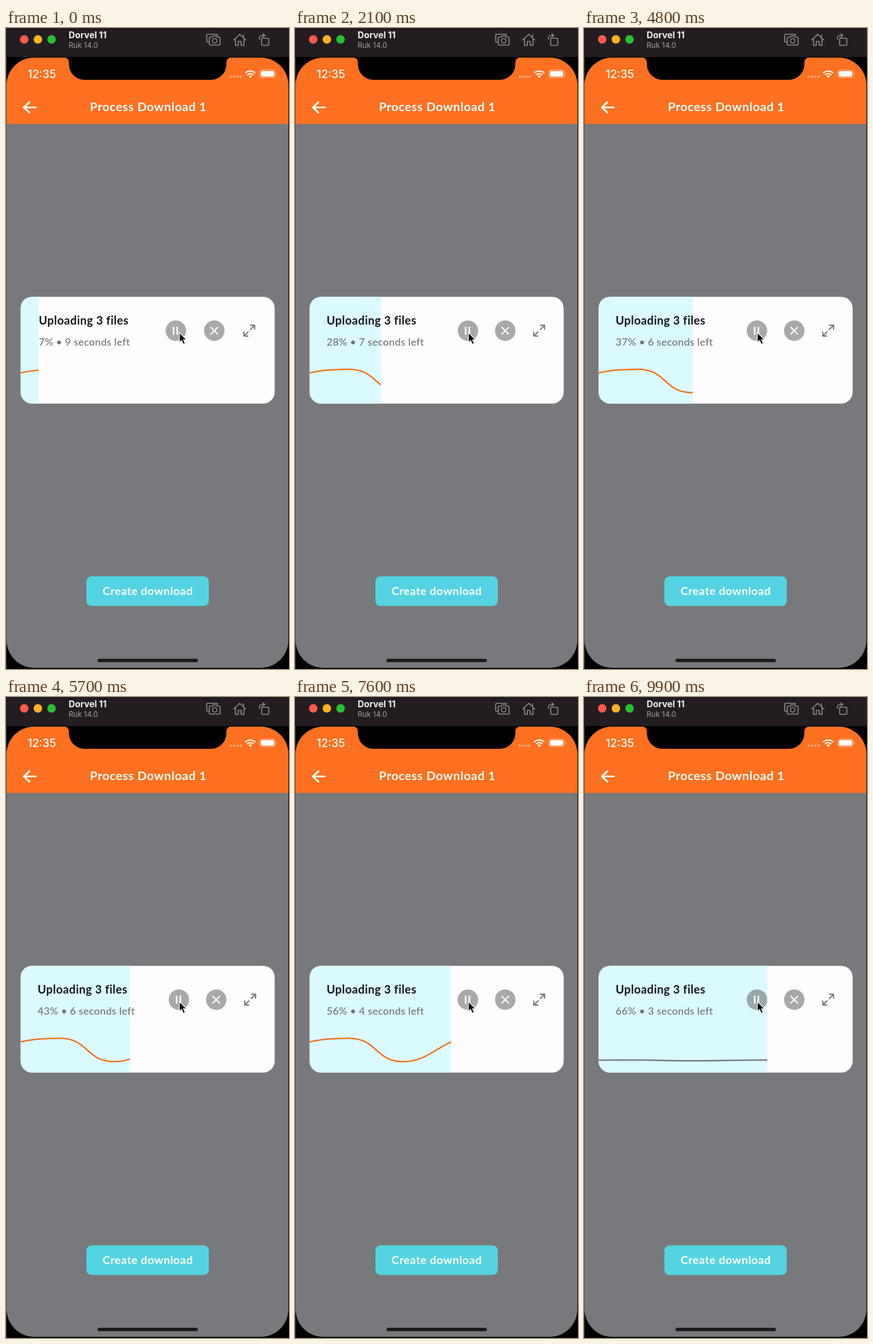
Write an HTML page that moves like this. It is 497x1126 px and loops after 10 s.

```html
<!DOCTYPE html>
<html lang="en">
<head>
<meta charset="utf-8">
<title>Upload progress</title>
<style>
  html, body { margin: 0; width: 100%; height: 100%; overflow: hidden; background: #000; }
  svg { display: block; width: 497px; height: 1126px; }
  text { font-family: Lato, sans-serif; font-weight: 700; }
  .ui { font-family: Inter, sans-serif; }
  .line { fill: none; stroke-linecap: round; stroke-linejoin: round; }
</style>
</head>
<body>
<svg viewBox="0 0 497 1126">
  <defs>
    <clipPath id="screen"><rect x="1" y="52" width="495" height="1072" rx="49"/></clipPath>
    <clipPath id="card"><rect x="25.600" y="472.200" width="446.200" height="187.500" rx="20"/></clipPath>
    <clipPath id="done"><rect id="doneArea" x="25.600" y="472" height="188"/></clipPath>
  </defs>

  <!-- Window bar -->
  <rect width="497" height="51" fill="#231d22"/>
  <circle cx="32" cy="20" r="7.5" fill="#ff5a50"/>
  <circle cx="56" cy="20" r="7.5" fill="#ffb224"/>
  <circle cx="80" cy="20" r="7.5" fill="#28c131"/>
  <text class="ui" x="110" y="18" font-size="15.5" fill="#f4f2f4">Dorvel 11</text>
  <text class="ui" x="110" y="35" font-size="13" style="font-weight:400" fill="#a39fa3">Ruk 14.0</text>
  <g class="line" stroke="#969196" stroke-width="1.6">
    <path d="M356 25h-1.500a2 2 0 0 1-2-2v-10a2 2 0 0 1 2-2h15a2 2 0 0 1 2 2"/>
    <path d="M359 16h3l1.500-2h6l1.500 2h3a2 2 0 0 1 2 2v10a2 2 0 0 1-2 2h-15a2 2 0 0 1-2-2v-10a2 2 0 0 1 2-2z"/>
    <circle cx="366.500" cy="22.500" r="4"/>
    <path d="M400 21L410.500 11L421 21M403 19v11.500h5v-7h5v7h5V19M417 16v-4"/>
    <path d="M449 18h10.500a2 2 0 0 1 2 2v8.500a2 2 0 0 1-2 2H451a2 2 0 0 1-2-2zM445 20v-2a5 5 0 0 1 5-5h4M451 10l3.500 3L451 16"/>
  </g>

  <!-- Phone screen -->
  <g clip-path="url(#screen)">
    <rect y="52" width="497" height="1074" fill="#78797c"/>
    <rect y="52" width="497" height="116.600" fill="#ff7020"/>
  </g>
  <path d="M0.500 51V1126" stroke="#4c4a4c"/>
  <path d="M101 51.500Q110.500 52 110.500 61V64A27 27 0 0 0 137.500 91H360A27 27 0 0 0 387 64V61Q387 52 396.500 51.500Z"/>
  <g fill="#fff">
    <text class="ui" x="38" y="88" font-size="19.5" style="font-weight:500">12:35</text>
    <g opacity=".35">
      <circle cx="394.500" cy="85.500" r="2.200"/><circle cx="400.300" cy="85.500" r="2.200"/>
      <circle cx="406.100" cy="85.500" r="2.200"/><circle cx="411.900" cy="85.500" r="2.200"/>
    </g>
    <path d="M429 88l-3-3.200a4.300 4.300 0 0 1 6 0z"/>
    <g class="line" stroke="#fff" stroke-width="2.300" style="stroke-linecap:butt">
      <path d="M420.200 79.200a12.500 12.500 0 0 1 17.600 0M423.400 82.500a8 8 0 0 1 11.200 0"/>
    </g>
    <rect x="445.500" y="73.500" width="27.500" height="14" rx="4" fill="none" stroke="#fff" stroke-opacity=".5"/>
    <rect x="447.500" y="75.500" width="23.500" height="10" rx="2.500"/>
    <path d="M474.500 78.300q2 2.200 0 4.400z" opacity=".6"/>
    <path class="line" d="M41 130.500L31.500 139.500L41 148.500M32 139.500H52.500" stroke="#fff" stroke-width="3.200"/>
    <text x="249.800" y="145.500" font-size="21.4" letter-spacing=".6" text-anchor="middle">Process Download 1</text>
    <rect x="141.200" y="963.300" width="215" height="52" rx="9" fill="#54d4e2"/>
    <text x="248.900" y="996" font-size="19.9" letter-spacing=".5" text-anchor="middle">Create download</text>
  </g>
  <rect x="160.500" y="1108" width="176.500" height="6" rx="3" fill="#1c1c1e"/>

  <!-- Upload card -->
  <g clip-path="url(#card)">
    <rect x="25" y="472" width="448" height="188" fill="#fffdff"/>
    <g clip-path="url(#done)">
      <rect x="25" y="472" width="448" height="188" fill="#dafaff"/>
      <path id="wave" fill="none" stroke-width="2.500"/>
    </g>
  </g>
  <g id="label">
    <text y="520.800" font-size="20.2" letter-spacing=".45" fill="#15171b">Uploading 3 files</text>
    <text id="status" y="558" font-size="18" letter-spacing=".3" fill="#717275" style="font-weight:500"></text>
  </g>
  <g id="pause">
    <circle r="18" fill="#717173" fill-opacity=".6"/>
    <path d="M-4-7V7M2.500-7V7" stroke="#fff" stroke-width="2.800"/>
  </g>
  <g id="cancel">
    <circle r="18" fill="#717173" fill-opacity=".6"/>
    <path class="line" d="M-6-6L6 6M6-6L-6 6" stroke="#fff" stroke-width="2.200"/>
  </g>
  <path id="expand" class="line" d="M2.500-9.500H9.500V-2.500M9.500-9.500L2-2M-2.500 9.500H-9.500V2.500M-9.500 9.500L-2 2" stroke="#77787b" stroke-width="2.200"/>
  <path d="M304.500 535V552.500L308.400 548.800L311.300 555.600L314.600 554.200L311.700 547.500H317Z" stroke="#fff" stroke-width="1.200"/>
</svg>

<script>
const $ = id => document.getElementById(id);
const LOOP = 10000, STEP = 100, FADE = 500;
const PAUSE = 2610, RESUME = 4220, PAUSE_AGAIN = 9194;
const START = 7.06, RUN = 10000;
const HELD = START + PAUSE / RUN * 100;

// Each run takes ten seconds to cover whatever is left.
function progress(t) {
  if (t < RESUME) return START + Math.min(t, PAUSE) / RUN * 100;
  return HELD + (Math.min(t, PAUSE_AGAIN) - RESUME) / RUN * (100 - HELD);
}

const ease = x => {
  const c = Math.max(0, Math.min(1, x));
  return c * c * (3 - 2 * c);
};
const mix = (a, b, k) => a + (b - a) * k;

// 0 = full wave, 1 = flat
const flatness = t =>
  ease((t - PAUSE) / FADE) - ease((t - RESUME) / FADE) + ease((t - PAUSE_AGAIN) / FADE);

function wavePath(flat) {
  const y = v => mix(599.5 + v, 637.8 + v * 0.03, flat).toFixed(2);
  const hi = y(0), lo = y(41);
  return `M25 ${y(6.5)}C45 ${y(1.5)} 75 ${hi} 95 ${hi}` +
    `C145 ${hi} 140 ${lo} 190 ${lo}C240 ${lo} 257 ${hi} 307 ${hi}` +
    `C357 ${hi} 360 ${lo} 410 ${lo}S450 ${y(25)} 472 ${y(15)}`;
}

const place = (id, x, y) => $(id).setAttribute('transform', `translate(${x} ${y})`);

function draw(t) {
  const p = progress(t), flat = flatness(t), percent = Math.round(p);
  const short = percent < 10;

  $('doneArea').setAttribute('width', 4.462 * p);
  $('wave').setAttribute('d', wavePath(flat));
  $('wave').setAttribute('stroke',
    `rgb(${mix(244, 119, flat)},${mix(110, 120, flat)},${mix(28, 123, flat)})`);
  $('status').textContent = `${percent}% • ${Math.round((100 - p) / 10)} seconds left`;

  place('label', short ? 57.5 : 55.5, 0);
  place('pause', short ? 298.3 : 303.7, 531.7);
  place('cancel', short ? 365.8 : 369.2, 531.7);
  place('expand', short ? 427.2 : 428.8, 531.7);
}

const begin = performance.now();
function tick() {
  const t = (performance.now() - begin) % LOOP;
  draw(Math.floor(t / STEP) * STEP);
  requestAnimationFrame(tick);
}
tick();
</script>
</body>
</html>
```
